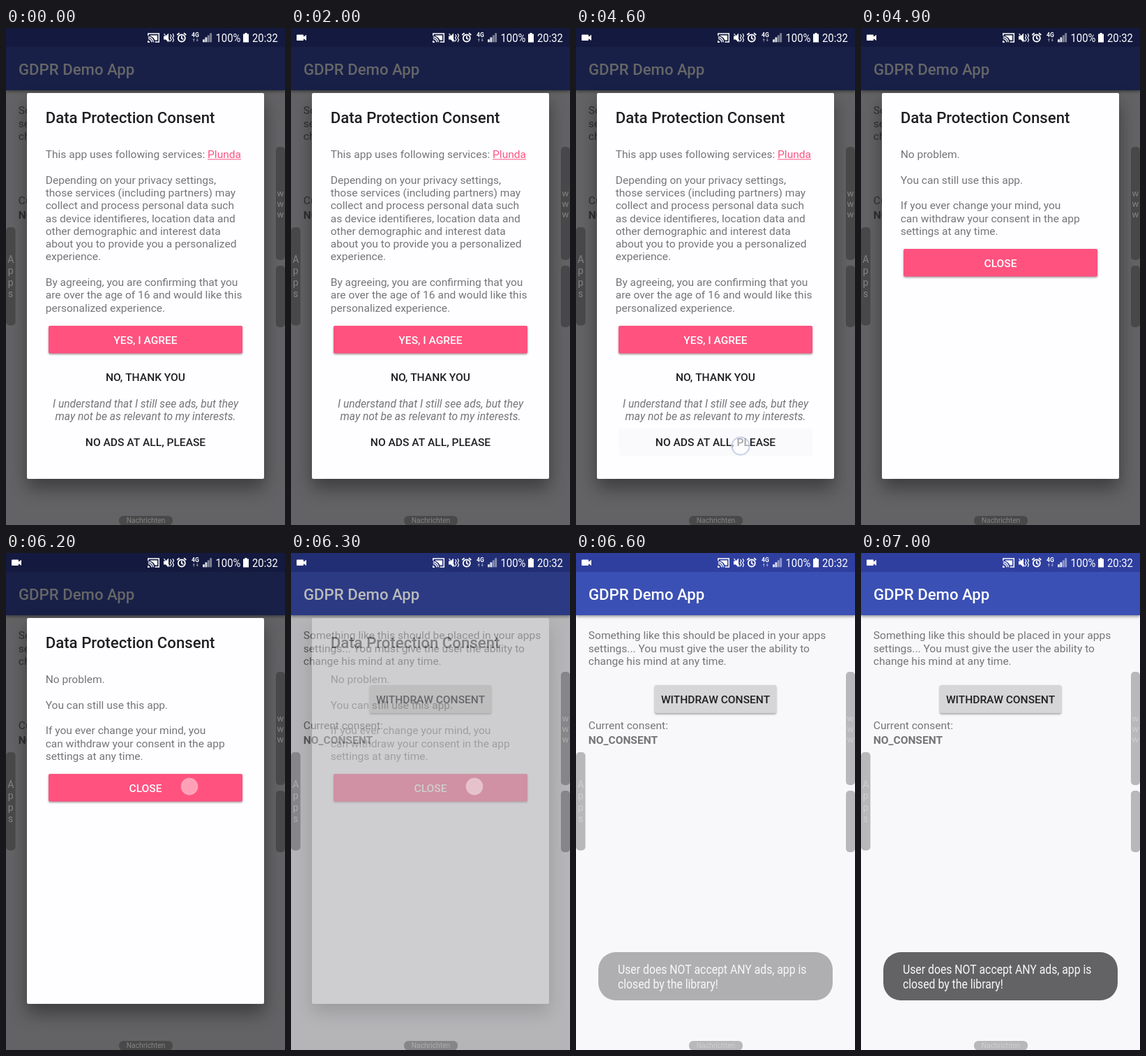
These frames come from a looping animation (400x711 px, 8000 ms). An HTML page with a canvas:

```html
<!DOCTYPE html>
<html lang="en">
<head>
<meta charset="utf-8">
<title>Consent dialog</title>
<style>
html, body { margin: 0; width: 100%; height: 100%; overflow: hidden; background: #f8f7fa; }
canvas { display: block; width: 400px; height: 711px; }
</style>
</head>
<body>
<canvas id="stage"></canvas>
<script>
const W = 400, H = 711, LOOP = 8000, TICK = 100;
const BODY = 15.56, LINE = 18.3, TITLE = 22.2;
const CONDENSED = 0.888;
const GREY = '#757477', DARK = '#1f1f21', PINK = '#ff527f';
const dpr = window.devicePixelRatio || 1;

function setup(canvas) {
  canvas.width = W * dpr;
  canvas.height = H * dpr;
  const c = canvas.getContext('2d');
  c.scale(dpr, dpr);
  return c;
}

const screen2d = setup(document.getElementById('stage'));
const layer = document.createElement('canvas');
const layer2d = setup(layer);

function text(c, str, x, y, { size = BODY, weight = 400, color = GREY, align = 'left', style = '' } = {}) {
  c.font = `${style} ${weight} ${size}px Roboto, sans-serif`;
  c.fillStyle = color;
  c.textAlign = align;
  c.fillText(str, x, y);
}

function lines(c, rows, x, y, opts, step = LINE) {
  rows.forEach((row, i) => text(c, row, x, y + i * step, opts));
}

function narrow(c, str, x, y, size, color) {
  c.save();
  c.translate(x, y);
  c.scale(CONDENSED, 1);
  text(c, str, 0, 0, { size, color });
  c.restore();
}

function box(c, x, y, w, h, r, fill, shadow) {
  c.save();
  if (shadow) {
    c.shadowColor = `rgba(0,0,0,${shadow.a})`;
    c.shadowBlur = shadow.blur * dpr;
    c.shadowOffsetY = shadow.y * dpr;
  }
  c.fillStyle = fill;
  c.beginPath();
  c.roundRect(x, y, w, h, r);
  c.fill();
  c.restore();
}

function button(c, label, x, y, w, h, fill, color) {
  box(c, x, y, w, h, 2, fill, { a: 0.38, blur: 3, y: 1.5 });
  text(c, label, x + w / 2, y + h / 2 + 5.8, { weight: 500, color, align: 'center' });
}

function drawApp(c) {
  c.fillStyle = '#f8f7fa';
  c.fillRect(0, 0, W, H);
  box(c, 0, 0, W, 89, 0, '#3b50b4', { a: 0.4, blur: 4, y: 1.5 });
  c.fillStyle = '#2f3f9f';
  c.fillRect(0, 0, W, 27);
  text(c, 'GDPR Demo App', 18, 66.9, { size: TITLE, weight: 500, color: '#fff' });
  lines(c, [
    'Something like this should be placed in your apps',
    'settings... You must give the user the ability to',
    'change his mind at any time.'
  ], 17.8, 123.3);
  button(c, 'WITHDRAW CONSENT', 113, 189, 174, 40, '#d6d5d7', DARK);
  text(c, 'Current consent:', 17.8, 252.3);
  text(c, 'NO_CONSENT', 17.8, 273.4, { weight: 700 });
}

function drawQuestion(c, press) {
  const intro = 'This app uses following services: ';
  const name = 'Plunda';
  text(c, intro, 56.7, 186);
  const x = 56.7 + c.measureText(intro).width;
  text(c, name, x, 186, { color: PINK });
  c.fillRect(x, 187.4, c.measureText(name).width, 1);
  lines(c, [
    'Depending on your privacy settings,',
    'those services (including partners) may',
    'collect and process personal data such',
    'as device identifieres, location data and',
    'other demographic and interest data',
    'about you to provide you a personalized',
    'experience.',
    '',
    'By agreeing, you are confirming that you',
    'are over the age of 16 and would like this',
    'personalized experience.'
  ], 56.7, 222.6);
  button(c, 'YES, I AGREE', 61, 426, 278, 39.5, PINK, '#fff');
  if (press) box(c, 61, 573, 278, 39, 2, `rgba(0,0,0,${press})`);
  const flat = { weight: 500, color: DARK, align: 'center' };
  text(c, 'NO, THANK YOU', 200, 505, flat);
  lines(c, [
    'I understand that I still see ads, but they',
    'may not be as relevant to my interests.'
  ], 200, 542.5, { style: 'italic', align: 'center' });
  text(c, 'NO ADS AT ALL, PLEASE', 200, 598, flat);
}

function drawAnswer(c) {
  lines(c, [
    'No problem.',
    '',
    'You can still use this app.',
    '',
    'If you ever change your mind, you',
    'can withdraw your consent in the app',
    'settings at any time.'
  ], 56.7, 186);
  button(c, 'CLOSE', 61, 316, 278, 39.5, PINK, '#fff');
}

function drawDialog(c, t) {
  c.clearRect(0, 0, W, H);
  box(c, 30, 93, 340, 552, 2, '#fefdff', { a: 0.4, blur: 26, y: 13 });
  text(c, 'Data Protection Consent', 56.7, 136.2, { size: TITLE, weight: 500, color: DARK });
  if (t < 4800) drawQuestion(c, t >= 4700 ? 0.05 : t >= 4600 ? 0.015 : 0);
  else drawAnswer(c);
}

function drawToast(c) {
  c.clearRect(0, 0, W, H);
  box(c, 32, 571, 336, 69, 25, '#636264');
  narrow(c, 'User does NOT accept ANY ads, app is', 60, 602.2, 17.78, '#f8f8f8');
  narrow(c, 'closed by the library!', 60, 623, 17.78, '#f8f8f8');
}

function stamp(c, alpha) {
  c.save();
  c.globalAlpha = alpha;
  c.drawImage(layer, 0, 0, W, H);
  c.restore();
}

function drawHandles(c) {
  const shade = 'rgba(0,0,0,0.26)', color = 'rgba(255,255,255,0.32)';
  box(c, 0, 285, 13.5, 140.5, 5, shade);
  box(c, 387, 170, 13, 162, 5, shade);
  box(c, 387, 340, 13, 88, 5, shade);
  box(c, 162, 698, 77, 13.5, 6, shade);
  lines(c, [...'Apps'], 6.7, 336, { size: 14, color, align: 'center' }, 16.3);
  lines(c, [...'www'], 393.4, 241, { size: 13, color, align: 'center' }, 15);
  text(c, 'Nachrichten', 200.5, 708.2, { size: 10.3, color, align: 'center' });
}

const icons = {
  camera: new Path2D('M9 9.5H17Q18 9.5 18 10.5V12.5L22 9.8V18L18 15.3V17Q18 18 17 18H9Q8 18 8 17V10.5Q8 9.5 9 9.5Z'),
  cast: new Path2D('M203.8 11V8H219.3V20H213.5M203.8 15.3A5 5 0 0 1 208.8 20.3M203.8 12.8A7.5 7.5 0 0 1 211.3 20.3'),
  castFill: new Path2D('M203 18A3 3 0 0 1 206 21H203ZM207 10.5H217V17.5H213.5A10 10 0 0 0 207 11.5Z'),
  speaker: new Path2D('M226 11.5H229L233 7.5V20.5L229 16.5H226Z'),
  buzz: new Path2D('M226.5 8L235 19.5M235.5 9L237 11.5L235.5 14L237 16.5L235.5 19M239 8L240.5 11L239 14L240.5 17L239 20'),
  alarm: new Path2D('M256.8 14.5A5 5 0 1 1 246.8 14.5A5 5 0 1 1 256.8 14.5M251.8 11.2V14.7L254.3 16.3M245.3 10L248.6 7.2M258.3 10L255 7.2'),
  arrows: new Path2D('M267.5 17L269.3 14.8L271 17ZM268.7 17H269.9V19.5H268.7ZM272.5 17.3L274.2 19.5L276 17.3ZM273.6 14.8H274.8V17.3H273.6Z'),
  battery: new Path2D('M342.5 7H345.5V8.5H348V20.5H340V8.5H342.5Z')
};

function drawStatus(c, recording) {
  c.fillStyle = c.strokeStyle = '#fff';
  c.lineWidth = 1.5;
  ['castFill', 'speaker', 'battery'].forEach(k => c.fill(icons[k]));
  if (recording) c.fill(icons.camera);
  c.stroke(icons.cast);
  c.lineWidth = 1.2;
  c.stroke(icons.buzz);
  c.lineWidth = 1.8;
  c.stroke(icons.alarm);
  c.globalAlpha = 0.5;
  c.fill(icons.arrows);
  for (let i = 0; i < 4; i++) {
    const h = 4 + i * 3;
    c.globalAlpha = i < 2 ? 0.85 : 0.45;
    c.fillRect(282 + i * 3.4, 20.3 - h, 2.9, h);
  }
  c.globalAlpha = 1;
  text(c, '4G', 266, 13.2, { size: 8.5, weight: 700, color: '#fff' });
  narrow(c, '100%', 300.5, 20, 16.7, '#fff');
  narrow(c, '20:32', 353, 20, 16.7, '#fff');
}

function touch(c, x, y, r, fill, rim) {
  c.beginPath();
  c.arc(x, y, r, 0, Math.PI * 2);
  c.fillStyle = fill;
  c.fill();
  c.strokeStyle = rim;
  c.lineWidth = 2;
  c.stroke();
}

function drawTouch(c, t) {
  if (t >= 4600 && t < 4900) {
    const a = [0.6, 0.6, 0.25][(t - 4600) / TICK];
    touch(c, 236, 598, 12.5, `rgba(255,255,255,${a})`, `rgba(165,178,220,${a})`);
  } else if (t >= 6100 && t < 6400) {
    const a = t < 6200 ? 0.3 : 0.45;
    touch(c, 263, 334, 11.7, `rgba(255,255,255,${a})`, `rgba(255,225,232,${a * 0.6})`);
  }
}

function draw(now) {
  const t = Math.floor((now % LOOP) / TICK) * TICK;
  const c = screen2d;
  drawApp(c);
  if (t < 6400) {
    const closing = t >= 6300;
    c.fillStyle = `rgba(0,0,0,${closing ? 0.27 : 0.6})`;
    c.fillRect(0, 0, W, H);
    drawDialog(layer2d, t);
    stamp(c, closing ? 0.35 : 1);
  } else {
    drawToast(layer2d);
    stamp(c, Math.min(1, 0.135 + 0.173 * (t - 6400) / TICK));
  }
  drawHandles(c);
  drawStatus(c, t >= 100);
  drawTouch(c, t);
}

const start = performance.now();
function loop() {
  draw(performance.now() - start);
  requestAnimationFrame(loop);
}
loop();
</script>
</body>
</html>
```
